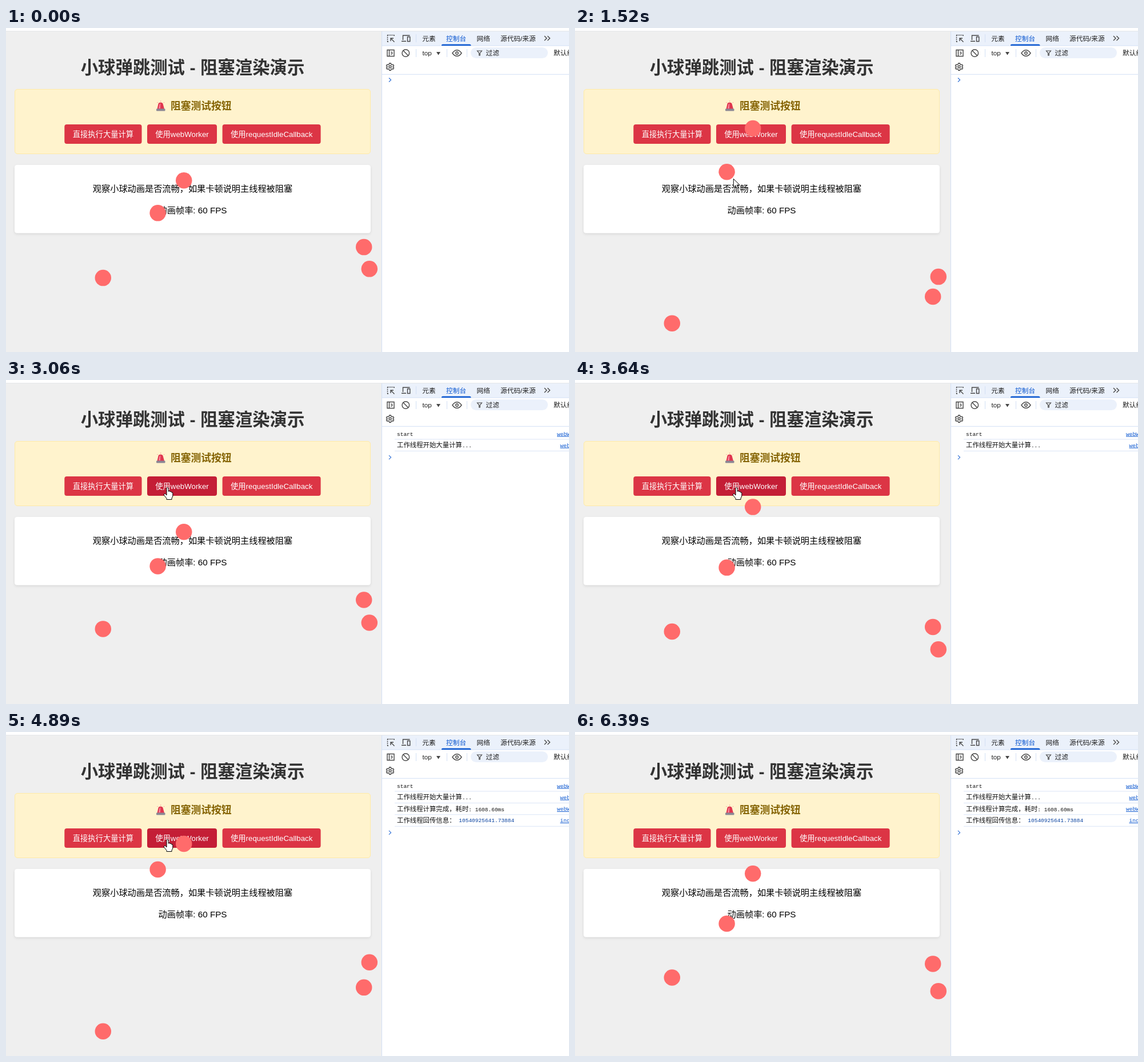
An HTML page that plays this animation: 985 px wide and 568 px high, repeating every 6.42 s.

```html
<!DOCTYPE html>
<html lang="zh-CN">
<head>
<meta charset="utf-8">
<title>小球弹跳测试</title>
<style>
html, body { margin: 0; width: 100%; height: 100%; overflow: hidden; background: #fff; }
svg { display: block; width: 985px; height: 568px; font-family: "Liberation Sans", "Noto Sans CJK SC", "Noto Sans CJK", sans-serif; }
.mid { text-anchor: middle; }
.btn rect { fill: #dc3545; }
.btn.hover rect { fill: #c41e36; }
.btn text { fill: #fff; font-size: 13.3px; text-anchor: middle; }
.tab { font-size: 11.7px; fill: #1f1f1f; }
.icon { fill: none; stroke: #474747; stroke-width: 1.4; }
.log { font: 11.4px "Noto Sans CJK SC", "Noto Sans CJK", sans-serif; fill: #111; }
.log .m { font: 9.5px "Liberation Mono", monospace; }
.log .num { fill: #0842a0; }
.log .link { fill: #0b57d0; text-decoration: underline; }
.log path { stroke: #dbe5f7; }
</style>
</head>
<body>
<svg viewBox="0 0 985 568">
  <defs>
    <filter id="soft" x="-5%" y="-10%" width="110%" height="125%">
      <feDropShadow dx="0" dy="1.9" stdDeviation="1.9" flood-color="#000" flood-opacity=".1"/>
    </filter>
  </defs>

  <!-- page -->
  <rect width="985" height="568" fill="#fff"/>
  <rect y="5" width="657" height="563" fill="#efefef"/>
  <path d="M0 5.5H985" stroke="#e4e6ea"/>
  <text class="mid" x="326.5" y="79.5" font-size="30.4" font-weight="700" fill="#333">小球弹跳测试 - 阻塞渲染演示</text>

  <rect x="15.5" y="107.5" width="622" height="113" rx="4.5" fill="#fff3cd" stroke="#ffeaa7"/>
  <g>
    <path d="M264.5 142L266.5 133Q267 130.5 270.5 130.5T274.6 133L277 142Z" fill="#e0364f"/>
    <path d="M267 141L268.3 134.5Q268.6 132.5 270.3 132.5L270 141Z" fill="#f8849a"/>
    <rect x="263" y="141.5" width="15.5" height="4" rx="1" fill="#8b8794"/>
    <path d="M270.7 127.5V129M264.5 130L265.6 131.2M277 130L275.9 131.2" stroke="#f08a8a"/>
  </g>
  <text x="288" y="143" font-size="17.78" font-weight="700" fill="#856404">阻塞测试按钮</text>

  <g class="btn"><rect x="102.3" y="169" width="135.2" height="34" rx="4"/><text x="169.9" y="191.4">直接执行大量计算</text></g>
  <g class="btn" id="worker"><rect x="247" y="169" width="122" height="34" rx="4"/><text x="308" y="191.4">使用webWorker</text></g>
  <g class="btn"><rect x="378.6" y="169" width="172" height="34" rx="4"/><text x="464.7" y="191.4">使用requestIdleCallback</text></g>

  <rect x="15" y="240" width="623" height="119.5" rx="4.5" fill="#fff" filter="url(#soft)"/>
  <g class="mid" font-size="15.2" fill="#000">
    <text x="326.5" y="287.2">观察小球动画是否流畅，如果卡顿说明主线程被阻塞</text>
    <text x="326.5" y="325.2">动画帧率: 60 FPS</text>
  </g>
  <g id="balls" fill="#ff6b6b"></g>

  <!-- tool panel -->
  <rect x="657" y="6" width="328" height="562" fill="#fff"/>
  <rect x="657" y="6" width="328" height="25" fill="#ebf1fb"/>
  <path d="M657.5 6V568M657 31H985M657 81.3H985M717.5 11V25M717.5 37V51M771.5 37V51M806.5 37V51" stroke="#d3e0f5"/>
  <path d="M762 31V30Q762 28.5 764 28.5H811Q813.5 28.5 813.5 30V31Z" fill="#0b57d0"/>
  <g class="tab">
    <text x="728.3" y="22.6">元素</text>
    <text x="770" y="22.6" fill="#0b57d0">控制台</text>
    <text x="823.5" y="22.6">网络</text>
    <text x="865" y="22.6">源代码/来源</text>
    <text x="728.5" y="48">top</text>
    <text x="958" y="48">默认级别</text>
  </g>
  <rect x="813" y="34" width="135" height="19" rx="9.5" fill="#ebf1fb"/>
  <text class="tab" x="839.5" y="48">过滤</text>
  <path d="M753 42H760L756.5 47.5Z" fill="#474747"/>
  <g class="icon">
    <path d="M667.5 12.5H679M667.5 12V24M679 12V15M667 24H670" stroke-dasharray="2 1.4"/>
    <path d="M679.5 24.5L673.5 18.5M673 23V18H678"/>
    <path d="M694.5 21V13H706.5M692 23.3H700M702.5 15.5H706.8V23.5H702.5Z"/>
    <path d="M942 14L946 18L942 22M947.5 14L951.5 18L947.5 22"/>
    <path d="M667 38.5H679V49.5H667ZM670.5 38.5V49.5M673.5 41.5L676 44L673.5 46.5"/>
    <circle cx="699.3" cy="44" r="6.3"/><path d="M695 39.5L703.7 48.5"/>
    <path d="M781 44Q784.5 38.7 789 38.7T797 44Q793.5 49.3 789 49.3T781 44Z"/><circle cx="789" cy="44" r="2.2"/>
    <path d="M824.5 40H832.5L829.3 44V48H827.7V44Z" stroke-width="1.2"/>
    <circle cx="672" cy="68" r="2"/>
    <path d="M670.7 61.8H673.3L673.8 63.7L675.3 64.6L677.3 64L678.5 66.3L677 67.6V68.6L678.5 69.9L677.3 72.1L675.3 71.5L673.8 72.4L673.3 74.3H670.7L670.2 72.4L668.7 71.5L666.7 72.1L665.5 69.9L667 68.6V67.6L665.5 66.3L666.7 64L668.7 64.6L670.2 63.7Z"/>
  </g>

  <g class="log" id="row0"><path d="M680 103.9H985"/>
    <text class="m" x="684" y="97.5">start</text><text class="m link" x="964" y="97.5">webWorker.js</text></g>
  <g class="log" id="row1"><path d="M680 124.5H985"/>
    <text x="684" y="118.4">工作线程开始大量计算<tspan class="m">...</tspan></text><text class="m link" x="969.5" y="117.7">webWorker.js</text></g>
  <g class="log" id="row2"><path d="M680 144.8H985"/>
    <text x="684" y="138.8">工作线程计算完成，耗时<tspan class="m">: 1608.60ms</tspan></text><text class="m link" x="964" y="138">webWorker.js</text></g>
  <g class="log" id="row3"><path d="M680 165.3H985"/>
    <text x="684" y="158.8">工作线程回传信息：</text><text class="m num" x="792.3" y="158">10540925641.73884</text><text class="m link" x="969.5" y="158">index.html</text></g>
  <path id="prompt" d="M670 -3.5L673.5 0L670 3.5" fill="none" stroke="#3b78d8" stroke-width="1.3"/>

  <g id="cursor" stroke="#000" fill="#fff" stroke-linejoin="round">
    <path id="arrow" d="M.3 .5V15.3L3.8 12L6.2 17.2L8.7 16.1L6.4 11.1H11Z"/>
    <path id="hand" d="M-2 2Q-2 .5-.4 .5T1.2 2V7.5Q1.5 6.3 2.8 6.5T4.2 8.2Q4.6 7.2 5.8 7.6T6.8 9.2Q8.8 8.5 8.8 10.5V15Q8.8 17 7 19V21.5H-2V19.5L-6.5 14Q-7.3 12.2-5.8 11.6T-3.4 12.6L-2 14Z"/>
  </g>
</svg>
<script>
const LOOP = 6420, PERIOD = 3027, RISE = 95;
const CLICK = 2900, DONE = CLICK + 1609;
const $ = id => document.getElementById(id);

// x, lowest y, time of the lowest point
const balls = [
  [311.2, 269, -132],
  [265.6, 336, 346],
  [626.2, 475.2, 1318],
  [635.8, 477, 831],
  [169.8, 525.2, 1796]
].map(([x, low, at]) => {
  const el = document.createElementNS("http://www.w3.org/2000/svg", "circle");
  el.setAttribute("cx", x);
  el.setAttribute("r", 14.25);
  $("balls").append(el);
  return { el, low, at };
});

// time, x, y of the pointer tip
const path = [
  [300, 859, 543], [690, 693, 487], [850, 600, 452], [1000, 500, 437],
  [1150, 395, 350], [1400, 277, 264], [1650, 277, 264], [1850, 279, 212],
  [2100, 283, 188], [4910, 283, 188], [5050, 300, 213], [5200, 418, 217],
  [5370, 620, 252], [5450, 655, 268], [5800, 955, 545], [5880, 959, 552],
  [6020, 959, 570]
];

function pointer(t) {
  const i = path.findIndex(p => p[0] > t);
  if (i < 1) return null;
  const [t0, x0, y0] = path[i - 1], [t1, x1, y1] = path[i];
  const k = (t - t0) / (t1 - t0);
  return { x: x0 + (x1 - x0) * k, y: y0 + (y1 - y0) * k };
}

const show = (id, on) => { $(id).style.display = on ? "" : "none"; };

function draw(t) {
  for (const b of balls) {
    const lift = (1 - Math.cos((t - b.at) / PERIOD * 2 * Math.PI)) / 2;
    b.el.setAttribute("cy", b.low - RISE * lift);
  }

  const p = pointer(t);
  const over = !!p && p.x > 247 && p.x < 369 && p.y > 169 && p.y < 203;
  show("cursor", p);
  show("hand", over);
  show("arrow", !over);
  if (p) $("cursor").setAttribute("transform", `translate(${p.x} ${p.y})`);
  $("worker").classList.toggle("hover", over);

  const rows = [CLICK, CLICK + 40, DONE, DONE].map(at => t >= at);
  rows.forEach((on, i) => show("row" + i, on));
  const count = rows.filter(Boolean).length;
  const y = count ? 94.8 + 20.4 * count : 91;
  $("prompt").setAttribute("transform", `translate(0 ${y})`);
}

const start = performance.now();
function tick() {
  draw((performance.now() - start) % LOOP);
  requestAnimationFrame(tick);
}
tick();
</script>
</body>
</html>
```
